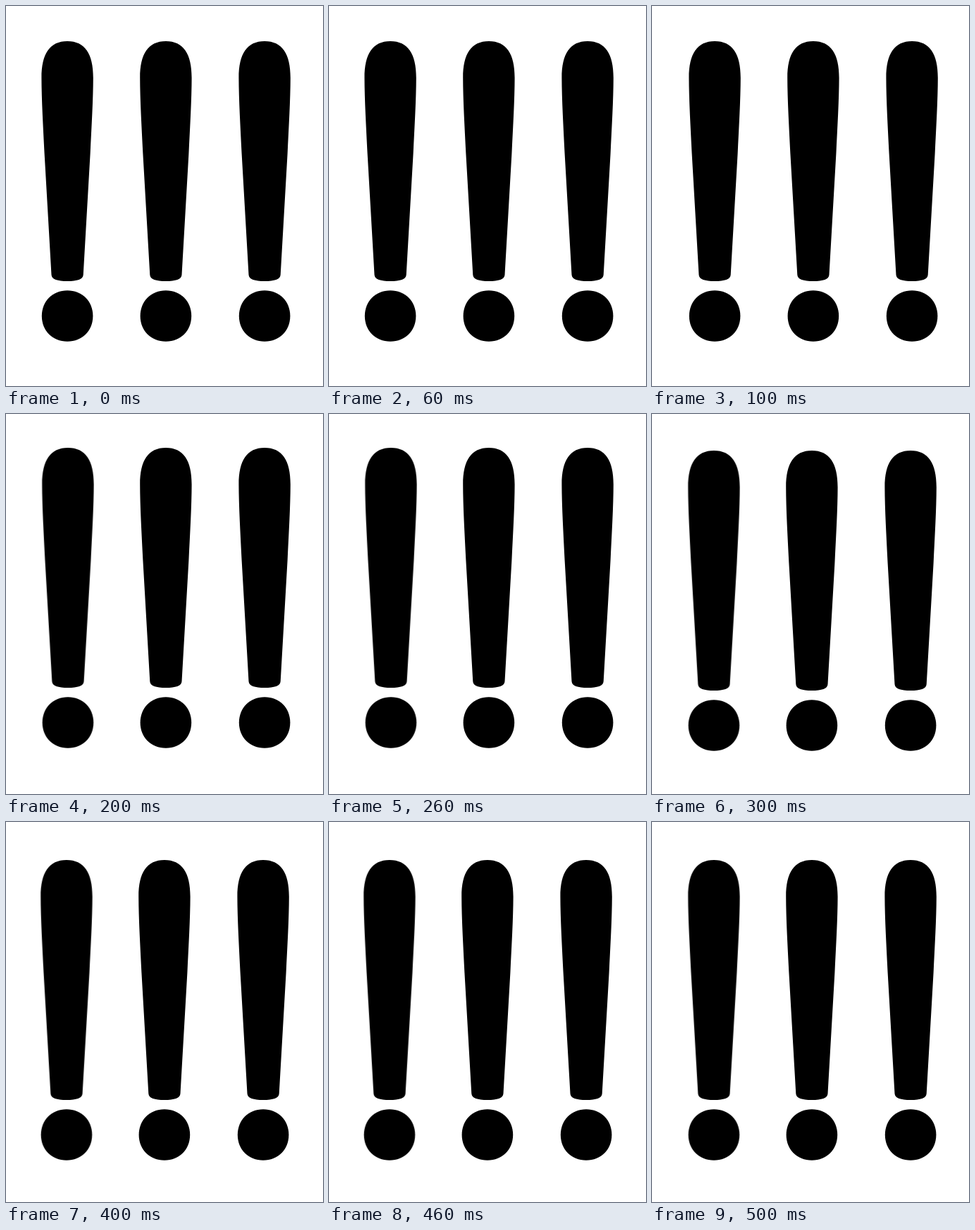
Recreate the animation shown at these times as an HTML page without scripts. Size 450 by 540 pixels, loop 600 ms.

```html
<!DOCTYPE html>
<html lang="en">
<head>
<meta charset="utf-8">
<title>Shaking exclamation marks</title>
<style>
  html, body { margin: 0; width: 100%; height: 100%; overflow: hidden; background: #fff; }
  svg { display: block; width: 100vw; height: 100vh; }
  .shake { animation: shake .6s step-end infinite; }
  .nudge { animation: nudge .6s step-end infinite; }
  @keyframes shake {
    0% { transform: translate(0, 0); }
    16.667% { transform: translate(2px, 0); }
    33.333% { transform: translate(0, -2px); }
    50% { transform: translate(0, 2px); }
    66.667% { transform: translate(-2px, 4px); }
    83.333% { transform: translate(0, 4px); }
  }
  @keyframes nudge {
    0% { transform: translateX(0); }
    33.333% { transform: translateX(.8px); }
  }
</style>
</head>
<body>
<svg viewBox="0 0 450 540">
  <defs>
    <g id="mark">
      <path d="M-36.7 102C-36.7 68 -25 50 0 50S36.7 68 36.7 102C36.7 132 34.2 175 32.5 210L22.6 382C22.2 388.5 14 391 0 391S-22.2 388.5 -22.6 382L-32.5 210C-34.2 175 -36.7 132 -36.7 102Z"/>
      <path d="M-36.3 440.5C-36.3 419.5 -21 404.2 0 404.2S36.3 419.5 36.3 440.5S21 476.8 0 476.8S-36.3 461.5 -36.3 440.5Z"/>
    </g>
  </defs>
  <g class="shake">
    <g class="nudge"><use href="#mark" x="87.1"/></g>
    <use href="#mark" x="226.9"/>
    <use href="#mark" x="367.1"/>
  </g>
</svg>
</body>
</html>
```
